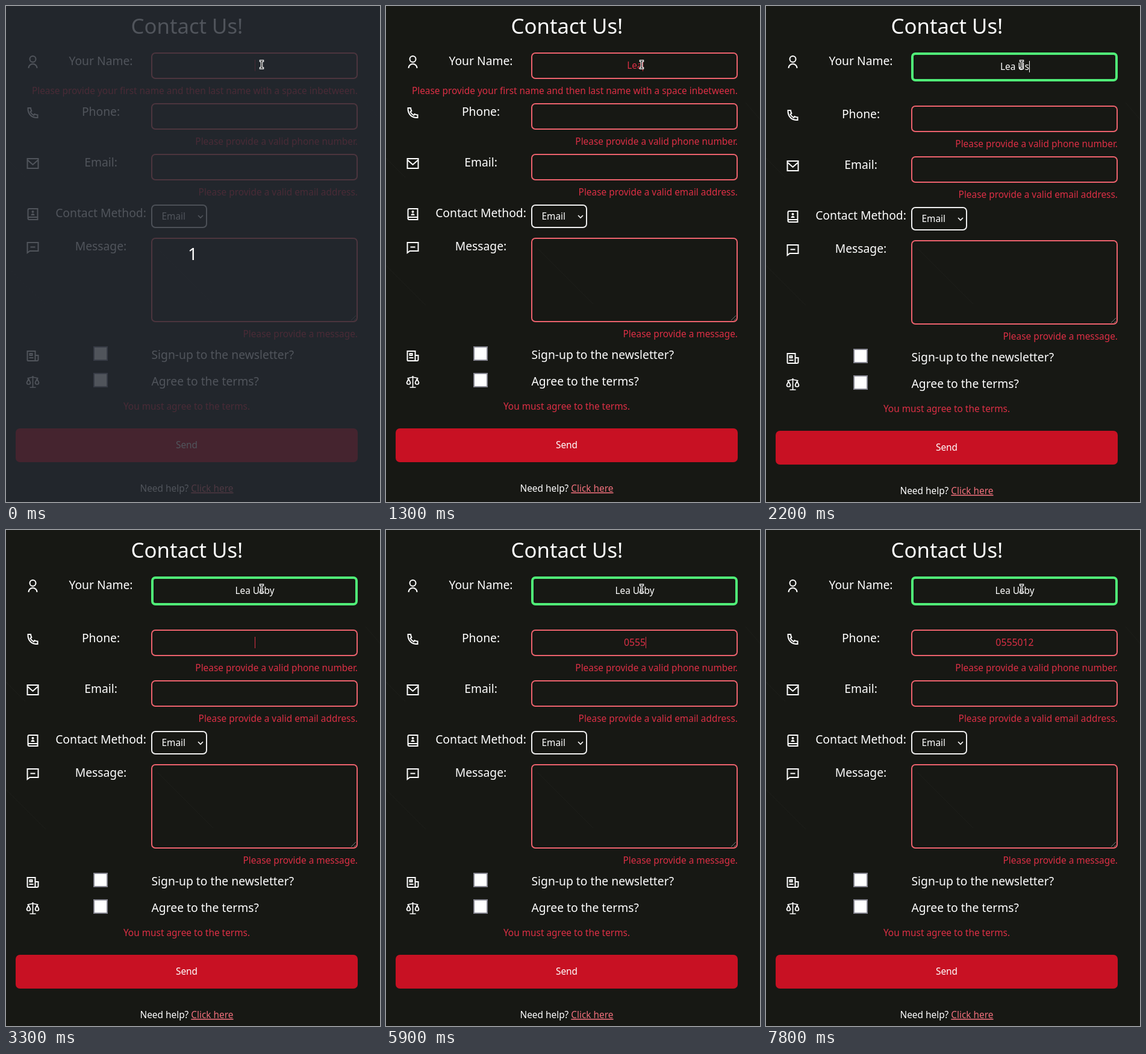
Write an HTML page that moves like this. It is 621 px wide and 822 px high and loops after 8 s.

```html
<!DOCTYPE html>
<html lang="en">
<head>
<meta charset="utf-8">
<title>Contact form</title>
<style>
  html, body { margin: 0; width: 100%; height: 100%; overflow: hidden; background: #171814; }
  svg { display: block; width: 621px; height: 822px; }
  text { font: 15.4px "Noto Sans", sans-serif; fill: #fff; white-space: pre; }
  .label { font-size: 19.3px; }
  .middle { text-anchor: middle; }
  .error { fill: #dc2f45; text-anchor: end; }
  .error.middle { text-anchor: middle; }
  .box { fill: none; stroke: #ec626d; stroke-width: 2; }
  .icon { fill: none; stroke: #fff; stroke-width: 2; }
  .check { fill: #fff; stroke: #858590; stroke-width: 2; }
  .link { fill: #f0707c; text-decoration: underline; }
  .digits { font-size: 15.8px; }
</style>
</head>
<body>
<svg viewBox="0 0 621 822">
  <rect width="621" height="822" fill="#171814"/>
  <path d="M0 430l66 66M252 402l92 92M0 252l32 32M597 160l24 28" stroke="#1d1e1a"/>
  <text class="middle" x="300.5" y="46" style="font-size:34.7px">Contact Us!</text>

  <path class="icon" transform="translate(32.5 81)" d="M12 2a5 5 0 0 1 0 10 5 5 0 0 1 0-10zM5 22a7 7 0 0 1 14 0"/>
  <text class="label middle" x="157.5" y="98">Your Name:</text>
  <rect class="box" id="nameBox" x="242" y="78" width="341" height="42" rx="6"/>
  <text class="middle" id="name" x="413"></text>
  <text class="error" id="nameError" x="584" y="146">Please provide your first name and then last name with a space inbetween.</text>

  <g id="rest">
    <g class="icon">
      <path transform="translate(32.5 165)" d="M4 4h4.5q.2 2.500 1.400 5l-2 1.400a11.500 11.500 0 0 0 5.700 5.700l1.400-2q2.500 1.200 5 1.400V20C10 20.500 3.500 14 4 4z"/>
      <path transform="translate(32.5 249)" d="M3 4h18v16H3zM3 6l9 8 9-8"/>
      <path transform="translate(32.5 333)" d="M4 19V5q0-2 2-2h14v18H6a2 2 0 0 1 0-4h14"/>
      <path transform="translate(32.5 333)" d="M12 6a2 2 0 0 1 0 4 2 2 0 0 1 0-4zM9 14a3 3 0 0 1 6 0z" fill="#fff" stroke="none"/>
      <path transform="translate(32.5 388)" d="M3 4h18v14H7l-4 3zM8 11.500h8"/>
      <path transform="translate(32.5 568)" d="M16 20V4H3v15q0 1 1 1h15q2 0 2-2v-7h-5v9M7 8h4v3H7zM6 15h7"/>
      <path transform="translate(32.5 611)" d="M12 2v19M7 21h10M3 6l9-2 9 2M5 7l-3 6a3 3 0 0 0 6 0zM19 7l-3 6a3 3 0 0 0 6 0z" stroke-width="1.7"/>
    </g>

    <text class="label middle" x="157.500" y="182">Phone:</text>
    <rect class="box" x="242" y="162" width="341" height="42" rx="6"/>
    <text class="error middle digits" id="phone" x="413" y="188"></text>
    <text class="error" x="584" y="230">Please provide a valid phone number.</text>

    <text class="label middle" x="157.500" y="266">Email:</text>
    <rect class="box" x="242" y="246" width="341" height="42" rx="6"/>
    <text class="error" x="584" y="314">Please provide a valid email address.</text>

    <text class="label middle" x="157.500" y="350">Contact Method:</text>
    <rect class="box" x="242" y="330" width="91" height="37" rx="6" style="stroke:#eee"/>
    <text x="258.500" y="354">Email</text>
    <path class="icon" d="M319 347l4 4 4-4" style="stroke-width:1.600"/>

    <text class="label middle" x="157.500" y="405">Message:</text>
    <rect class="box" x="242" y="385" width="341" height="138" rx="6"/>
    <path d="M573 521l8-8M578 521l3-3" stroke="#777"/>
    <text class="error" x="584" y="549">Please provide a message.</text>

    <rect class="check" x="146" y="565" width="22" height="22"/>
    <text class="label" x="241.500" y="585">Sign-up to the newsletter?</text>
    <rect class="check" x="146" y="609" width="22" height="22"/>
    <text class="label" x="241.500" y="629">Agree to the terms?</text>
    <text class="error middle" x="300" y="669">You must agree to the terms.</text>

    <rect x="16" y="700" width="568" height="56" rx="7" fill="#c81123"/>
    <text class="middle" x="300" y="733">Send</text>
    <text class="middle" x="300" y="805">Need help? <tspan class="link">Click here</tspan></text>
  </g>
  <rect id="caret" width="1" height="19"/>

  <g id="countdown">
    <rect width="621" height="822" fill="#252a33" opacity=".8"/>
    <text class="middle" x="310" y="421" style="font-size:28px">1</text>
  </g>
  <g fill="none" stroke-linecap="square">
    <path id="beam" d="M422.500 91h4M424.500 91v12M422.500 103h4" stroke="#fff" stroke-width="3.500"/>
    <path d="M422.500 91h4M424.500 91v12M422.500 103h4" stroke="#111" stroke-width="1.200"/>
  </g>
</svg>
<script>
const LOOP = 8000, VALID_AT = 2200, PHONE_AT = 3300;
const NAME = "Lea Usby", PHONE = "0555012";
const RED = "#dc2f45";

// [time, characters typed]
const nameKeys = [[900, 1], [1300, 3], [1800, 4], [2000, 5], [2200, 6], [2300, 7], [2900, 8]];
const phoneKeys = [[4300, 1], [4800, 2], [5400, 3], [5900, 4], [6600, 5], [7100, 6], [7700, 7]];
// spans in which the caret is blinked off
const caretOff = [[2100, 2200], [5500, 5900], [7800, 8000]];

const el = id => document.getElementById(id);
const typed = (word, keys, t) =>
  word.slice(0, keys.reduce((count, [at, n]) => t >= at ? n : count, 0));
const set = (node, attributes) => {
  for (const key in attributes) node.setAttribute(key, attributes[key]);
};
const show = (node, visible) => node.style.display = visible ? "" : "none";

function draw(t) {
  const valid = t >= VALID_AT, onPhone = t >= PHONE_AT;
  const name = el("name"), phone = el("phone"), caret = el("caret");

  name.textContent = typed(NAME, nameKeys, t);
  name.style.fill = valid ? "#fff" : RED;
  set(name, { y: valid ? 105.5 : 103.5 });
  phone.textContent = typed(PHONE, phoneKeys, t);

  const nameBox = el("nameBox");
  nameBox.style.stroke = valid ? "#50f078" : "";
  nameBox.style.strokeWidth = valid ? 4 : 2;
  set(nameBox, valid
    ? { x: 243, y: 79, width: 339, height: 44, rx: 5 }
    : { x: 242, y: 78, width: 341, height: 42, rx: 6 });
  show(el("nameError"), !valid);
  set(el("rest"), { transform: `translate(0 ${valid ? 4 : 0})` });

  const field = onPhone ? phone : name;
  const width = field.textContent ? field.getComputedTextLength() : 0;
  set(caret, {
    x: Math.round(413 + width / 2),
    y: onPhone ? 177 : valid ? 91 : 89,
    fill: valid && !onPhone ? "#fff" : RED
  });
  show(caret, !caretOff.some(([from, to]) => t >= from && t < to));
  show(el("countdown"), t < 100);
}

const start = performance.now();
function tick() {
  draw((performance.now() - start) % LOOP);
  requestAnimationFrame(tick);
}
tick();
</script>
</body>
</html>
```
